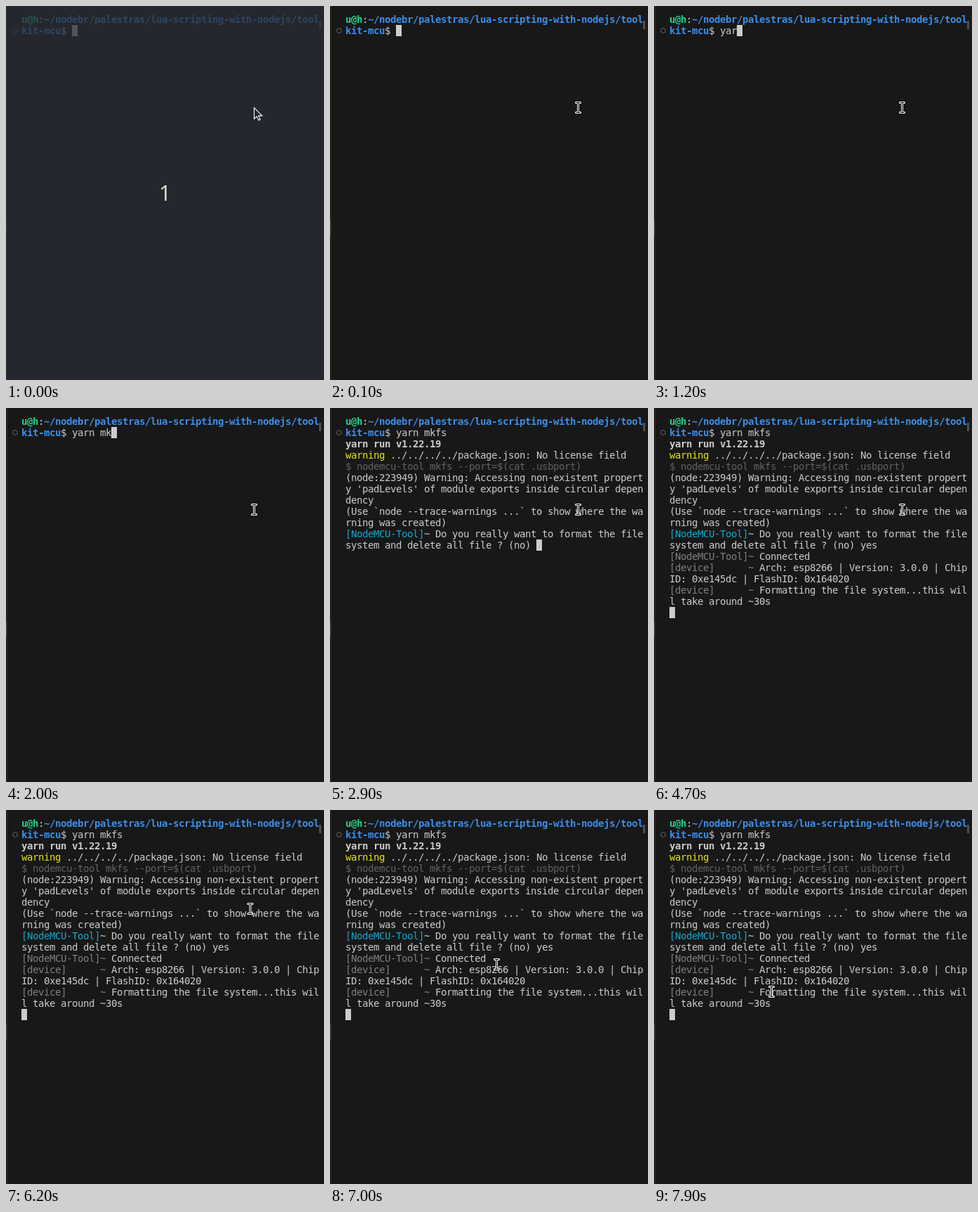
Recreate the animation shown at these times as an HTML page with a canvas. Size 453 px wide and 532 px high, loop 8 s.

```html
<!DOCTYPE html>
<html lang="en">
<head>
<meta charset="utf-8">
<title>Terminal session</title>
<style>
  html, body { margin: 0; width: 100%; height: 100%; overflow: hidden; background: #181818; }
  canvas { display: block; }
</style>
</head>
<body>
<canvas id="stage" width="453" height="532"></canvas>
<script>
const ctx = document.getElementById('stage').getContext('2d', { alpha: false });
const LOOP = 8000, TICK = 100;
const LEFT = 22, TOP = 11, CELL = 8, LINE = 16, COLUMNS = 53;
const FG = '#cccccc', GREEN = '#23d18b', BLUE = '#3b8eea', YELLOW = '#e5e510',
      CYAN = '#11a8cd', GREY = '#808080', DIM = '#626262';

// The terminal is a timed list of characters that wrap at the last column.
const cells = [];
let row = 0, col = 0;

function put(at, text, color = FG, weight = 'normal', gap = 0) {
  [...text].forEach((char, i) => {
    if (char === '\n' || col === COLUMNS) {
      row++;
      col = 0;
    }
    cells.push({ at: at + i * gap, char, color, weight, row, col });
    if (char !== '\n') col++;
  });
}

const type = (at, text, gap) => put(at, text, FG, 'normal', gap);

function log(at, text) {
  const split = text.indexOf('~') + 1;
  put(at, text.slice(0, split), GREY);
  put(at, text.slice(split) + '\n');
}

put(0, 'u@h', GREEN, 'bold');
put(0, ':');
put(0, '~/nodebr/palestras/lua-scripting-with-nodejs/toolkit-mcu', BLUE, 'bold');
put(0, '$ ');

type(800, 'y');
type(1100, 'a');
type(1200, 'rn mkf', 200);
type(2300, 's');
type(2600, '\n');

put(2800, 'yarn run v1.22.19\n', FG, 'bold');
put(2800, 'warning', YELLOW);
put(2800, ' ../../../../package.json: No license field\n');
put(2800, '$ nodemcu-tool mkfs --port=$(cat .usbport)\n', DIM);

put(2900, "(node:223949) Warning: Accessing non-existent property 'padLevels' " +
  'of module exports inside circular dependency\n' +
  '(Use `node --trace-warnings ...` to show where the warning was created)\n');
put(2900, '[NodeMCU-Tool]', CYAN);
put(2900, '~ Do you really want to format the filesystem and delete all file ? (no) ');

type(4000, 'yes', 100);
type(4500, '\n');

log(4700, '[NodeMCU-Tool]~ Connected');
log(4700, '[device]      ~ Arch: esp8266 | Version: 3.0.0 | ChipID: 0xe145dc | FlashID: 0x164020');
log(4700, '[device]      ~ Formatting the file system...this will take around ~30s');

// Pointer strokes: start, end and the control points of a cubic curve.
const strokes = [
  { from: 6200, to: 7000, x: [348, 318, 248, 237.5], y: [140.5, 90, 198, 219.5] },
  { from: 7000, to: 7400, x: [237.5, 232, 219, 209.5], y: [219.5, 228, 251, 259.5] },
  { from: 7500, to: 7900, x: [209.5, 203, 181, 167.5], y: [259.5, 262, 260, 258.5] },
];

const cubic = ([a, b, c, d], p) => {
  const q = 1 - p;
  return a * q ** 3 + 3 * b * q * q * p + 3 * c * q * p * p + d * p ** 3;
};

function pointerAt(t) {
  const time = Math.floor(t / TICK) * TICK;
  const stroke = strokes.findLast(s => s.from <= time);
  if (!stroke) return [353.5, 144.5];
  const p = Math.min(1, (time - stroke.from) / (stroke.to - stroke.from));
  return [cubic(stroke.x, p), cubic(stroke.y, p)];
}

function rect(color, x, y, w, h) {
  ctx.fillStyle = color;
  ctx.fillRect(x, y, w, h);
}

function strokePath(path, color, width) {
  ctx.strokeStyle = color;
  ctx.lineWidth = width;
  ctx.stroke(path);
}

function at(x, y, draw) {
  ctx.save();
  ctx.translate(x, y);
  draw();
  ctx.restore();
}

const ring = new Path2D();
ring.arc(0, 0, 3.4, 0, Math.PI * 2);
const beam = new Path2D('M-3 -7H3M-3 7H3M0 -7V7');
const arrow = new Path2D('M0 0V16L3.8 12.6L6.3 18L8.7 17L6.3 11.6H11.4Z');

function drawTerminal(t) {
  rect('#181818', 0, 0, 453, 532);
  rect('#2b2b2b', 1, 0, 1, 532);
  rect('#454545', 0, 305, 1, 21);
  rect('#4f4f4f', 446, 21, 3, 12);
  at(13, 35, () => strokePath(ring, '#666', 1));

  const visible = cells.filter(cell => cell.at <= t);
  for (const { char, color, weight, row, col } of visible) {
    if (char.trim() === '') continue;
    ctx.font = `${weight} 14px "DejaVu Sans Mono", monospace`;
    ctx.fillStyle = color;
    ctx.fillText(char, LEFT + col * CELL, TOP + row * LINE + 13);
  }

  const last = visible.at(-1);
  const cursorCol = last.char === '\n' ? 0 : last.col + 1;
  rect(FG, LEFT + cursorCol * CELL, TOP + last.row * LINE, CELL, LINE);
}

function drawBeam() {
  ctx.lineCap = 'round';
  strokePath(beam, '#fff', 3);
  ctx.lineCap = 'butt';
  strokePath(beam, '#000', 1);
}

function drawCountdown() {
  rect('rgba(40, 44, 53, 0.75)', 0, 0, 453, 532);
  ctx.font = '30px "Noto Sans", "Open Sans", sans-serif';
  ctx.fillStyle = '#d3dfcc';
  ctx.fillText('1', 218, 277);
  at(353.5, 144.5, () => strokePath(arrow, '#fff', 1.1));
}

function frame() {
  const t = performance.now() % LOOP;
  drawTerminal(t);
  if (t < TICK) drawCountdown();
  else at(...pointerAt(t), drawBeam);
  requestAnimationFrame(frame);
}
frame();
</script>
</body>
</html>
```
